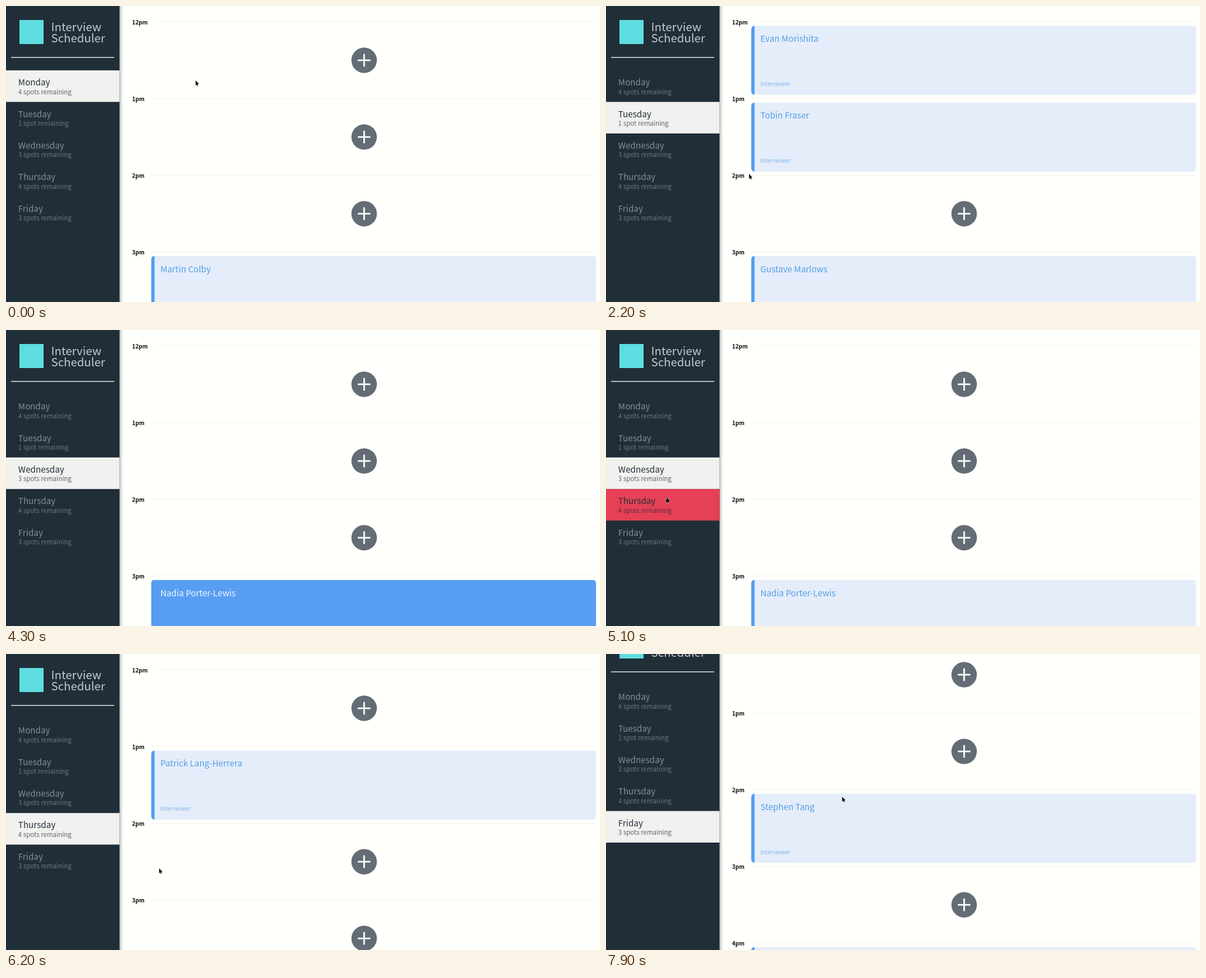
An HTML page with a canvas for the animation above (8 s loop, 1059 px wide and 529 px high).

```html
<!DOCTYPE html>
<html lang="en">
<head>
<meta charset="utf-8">
<title>Interview Scheduler</title>
<style>
  html, body { margin: 0; width: 100%; height: 100%; overflow: hidden; background: #fffffb; }
  canvas { display: block; width: 1059px; height: 529px; }
</style>
</head>
<body>
<canvas id="stage"></canvas>
<script>
const W = 1059, H = 529, LOOP = 8000, STEP = 100;
const FONT = '"Noto Sans CJK SC", "Noto Sans CJK JP", "Noto Sans CJK", "Open Sans", sans-serif';
const SIDE = 202.5, ROW_TOP = 115, ROW_H = 56.4, HOUR_H = 137.1;

const canvas = document.getElementById('stage');
const ctx = canvas.getContext('2d');
const ratio = window.devicePixelRatio || 1;
canvas.width = W * ratio;
canvas.height = H * ratio;

// Bookings are keyed by hour slot, 0 being 12pm.
const days = [
  { name: 'Monday', spots: 4, booked: { 3: 'Martin Colby' } },
  { name: 'Tuesday', spots: 1, booked: { 0: 'Evan Morishita', 1: 'Tobin Fraser', 3: 'Gustave Marlows', 4: 'Irene Walden' } },
  { name: 'Wednesday', spots: 3, booked: { 3: 'Nadia Porter-Lewis', 4: 'Irene Walden' } },
  { name: 'Thursday', spots: 4, booked: { 1: 'Patrick Lang-Herrera' } },
  { name: 'Friday', spots: 3, booked: { 2: 'Stephen Tang', 4: 'Irene Walden' } }
];
const hours = ['12pm', '1pm', '2pm', '3pm', '4pm'];

// Pointer path: time, x, y. Equal neighbours are rests.
const path = [
  [0, 338, 133], [200, 338, 133], [400, 325, 117], [600, 380, 150], [700, 420, 165],
  [800, 445, 160], [900, 445, 146], [1000, 445, 146], [1200, 270, 190], [1300, 160, 203],
  [1400, 118, 200], [1800, 118, 200], [2000, 180, 220], [2200, 255, 300], [2400, 337, 460],
  [2600, 331, 511], [2700, 336, 436], [2800, 336, 436], [2900, 318, 390], [3000, 304, 350],
  [3100, 304, 350], [3200, 200, 296], [3300, 111, 255], [3600, 111, 255], [3900, 300, 77],
  [4000, 420, 150], [4200, 440, 470], [4300, 440, 545], [4500, 420, 500], [4600, 420, 500],
  [4800, 330, 330], [4900, 250, 174], [5100, 108, 299], [5300, 108, 299], [5700, 400, 20],
  [5900, 420, 140], [6000, 420, 140], [6100, 335, 310], [6200, 273, 383], [6300, 300, 400],
  [6600, 285, 375], [6900, 112, 305], [7100, 112, 305], [7500, 380, 71], [7700, 468, 160],
  [7900, 421, 255]
];
// Selected day from each time on.
const picks = [[0, 0], [1800, 1], [3500, 2], [5300, 3], [7100, 4]];
// Hover spans: start, end, index.
const rowHovers = [[1300, 1800, 1], [3200, 3500, 2], [5100, 5300, 3], [6800, 7100, 4]];
const cardHovers = [[2400, 2900, 3], [4200, 4800, 3]];

function sample(keys, t) {
  let i = 0;
  while (i < keys.length - 2 && keys[i + 1][0] <= t) i++;
  const a = keys[i], b = keys[i + 1];
  const k = Math.max(0, Math.min(1, (t - a[0]) / (b[0] - a[0])));
  return a.slice(1).map((v, n) => v + (b[n + 1] - v) * k);
}

function activeIn(spans, t) {
  const span = spans.find(s => t >= s[0] && t < s[1]);
  return span ? span[2] : -1;
}

function text(str, x, y, size, weight, color) {
  ctx.font = `${weight} ${size}px ${FONT}`;
  ctx.fillStyle = color;
  ctx.fillText(str, x, y);
}

function rect(x, y, w, h, color) {
  ctx.fillStyle = color;
  ctx.fillRect(x, y, w, h);
}

function drawSidebar(selected, hovered, scroll) {
  const shade = ctx.createLinearGradient(SIDE, 0, SIDE + 7, 0);
  shade.addColorStop(0, 'rgba(70,85,110,.42)');
  shade.addColorStop(.4, 'rgba(90,105,130,.18)');
  shade.addColorStop(1, 'rgba(120,130,150,0)');
  rect(SIDE, scroll, 7, H, shade);
  rect(0, scroll, SIDE, H, '#202e38');

  rect(24, 25, 43, 43, '#5fdde0');
  text('Interview', 80.5, 44.5, 20.4, 300, '#c5cbd0');
  text('Scheduler', 80.5, 65.3, 20.4, 300, '#c5cbd0');
  rect(9, 91.2, 184, 1.4, '#f4f5f5');

  days.forEach((day, i) => {
    const y = ROW_TOP + i * ROW_H;
    const on = i === selected, hot = i === hovered && !on;
    if (on || hot) rect(0, y, SIDE, ROW_H, on ? '#f1f1ef' : '#e54056');
    const nameColor = on || hot ? '#22303b' : '#828e98';
    const spotColor = on ? '#5c666e' : hot ? '#5f2d3b' : '#6b7781';
    const noun = day.spots === 1 ? 'spot' : 'spots';
    text(day.name, 21.8, y + 27.2, 15.2, 400, nameColor);
    text(`${day.spots} ${noun} remaining`, 21.8, y + 42.5, 11.5, 300, spotColor);
  });
}

function drawCard(y, name, hot) {
  const x = 259, w = 793, h = 123.5;
  ctx.save();
  ctx.beginPath();
  ctx.roundRect(x, y, w, h, 6);
  ctx.clip();
  rect(x, y, w, h, hot ? '#579ef2' : '#e4edf9');
  rect(x, y, 5.8, h, '#549cf0');
  ctx.restore();
  text(name, 275.3, y + 29, 15.2, 400, hot ? '#f4f8fd' : '#559fe6');
  text('Interviewer', 275.5, y + 108, 10, 300, hot ? '#f4f8fd' : '#80b5ea');
}

function drawPlus(y) {
  const x = 638.5;
  ctx.fillStyle = '#646c75';
  ctx.beginPath();
  ctx.arc(x, y, 22.7, 0, Math.PI * 2);
  ctx.fill();
  rect(x - 11.3, y - 1.4, 22.6, 2.8, '#fffffb');
  rect(x - 1.4, y - 11.3, 2.8, 22.6, '#fffffb');
}

function drawSchedule(day, hotCard) {
  hours.forEach((hour, i) => {
    const y = 28 + i * HOUR_H;
    text(hour, 224.8, y + 4.8, 10, 600, '#0c0c0c');
    const left = i ? 259 : 264.5;
    rect(left, Math.round(y), 1052 - left, 1, '#f2f3f0');
    if (day.booked[i]) drawCard(y + 7.3, day.booked[i], i === hotCard);
    else drawPlus(y + 69);
  });
}

function polygon(points, fill, stroke) {
  ctx.beginPath();
  points.forEach(([x, y]) => ctx.lineTo(x, y));
  ctx.closePath();
  ctx.lineJoin = 'round';
  ctx.lineWidth = 1.2;
  ctx.strokeStyle = stroke;
  ctx.stroke();
  ctx.fillStyle = fill;
  ctx.fill();
}

function drawPointer(x, y, hand) {
  ctx.save();
  ctx.translate(x, y);
  if (hand) {
    polygon([[0, .5], [1.6, .5], [2, 3.2], [4.6, 3.4], [5, 6.5], [4.2, 9], [-.2, 9], [-2.6, 5.6], [-1.8, 4.8], [0, 5.8]],
      '#111', 'rgba(225,225,225,.75)');
  } else {
    polygon([[0, 0], [0, 9], [2, 7.2], [3.3, 10.2], [4.6, 9.6], [3.4, 6.7], [6.1, 6.5]],
      '#0a0a0a', 'rgba(255,255,255,.85)');
  }
  ctx.restore();
}

function draw(t) {
  const selected = picks.filter(p => p[0] <= t).pop()[1];
  const [scroll] = sample([[6300, 0], [6700, 60]], t);
  const [px, py] = sample(path, t);

  ctx.setTransform(ratio, 0, 0, ratio, 0, 0);
  rect(0, 0, W, H, '#fffffb');
  ctx.save();
  ctx.translate(0, -scroll);
  drawSchedule(days[selected], activeIn(cardHovers, t));
  drawSidebar(selected, activeIn(rowHovers, t), scroll);
  ctx.restore();

  const row = (py + scroll - ROW_TOP) / ROW_H;
  drawPointer(px, py, px < SIDE && row >= 0 && row < days.length);
}

const start = performance.now();
function tick() {
  const t = (performance.now() - start) % LOOP;
  draw(Math.floor(t / STEP) * STEP);
  requestAnimationFrame(tick);
}
tick();
</script>
</body>
</html>
```
